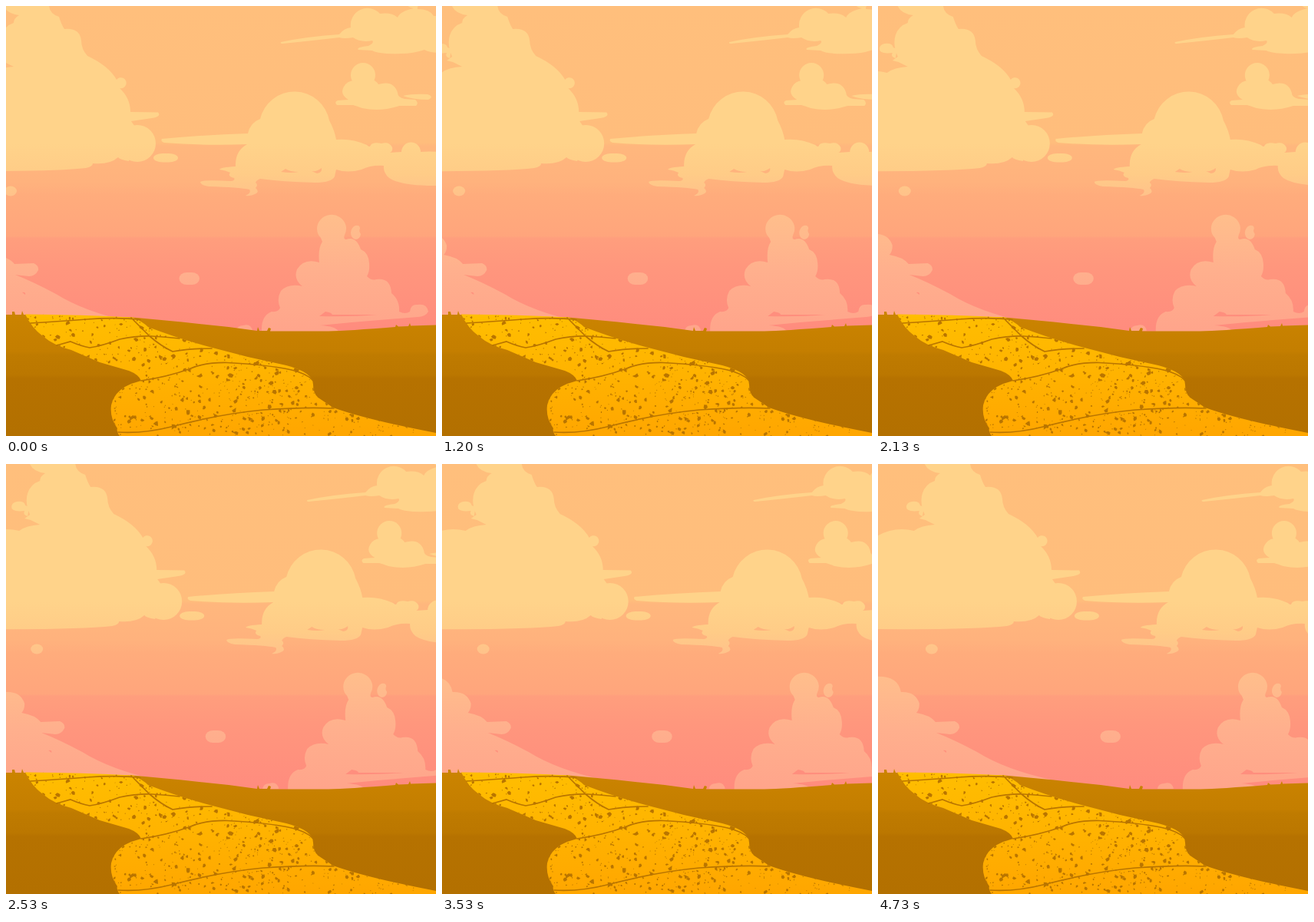
Write an HTML page that moves like this. It is 560 by 560 pixels and loops after 4800 ms.

```html
<!DOCTYPE html>
<html lang="en">
<head>
<meta charset="utf-8">
<title>Drifting clouds</title>
<style>
html, body { margin: 0; width: 100%; height: 100%; overflow: hidden; background: #ffbf7c; }
svg { display: block; width: 100%; height: 100%; }
</style>
</head>
<body>
<svg viewBox="0 0 560 560">
  <defs>
    <linearGradient id="sky" gradientUnits="userSpaceOnUse" x1="0" y1="0" x2="0" y2="560">
      <stop offset="0" stop-color="#ffbf7c"/>
      <stop offset=".318" stop-color="#ffbd7c"/>
      <stop offset=".325" stop-color="#ffb77d"/>
      <stop offset=".41" stop-color="#ffb27d"/>
      <stop offset=".44" stop-color="#ffac7c"/>
      <stop offset=".535" stop-color="#ffa57c"/>
      <stop offset=".54" stop-color="#ff9e7d"/>
      <stop offset=".61" stop-color="#ff967d"/>
      <stop offset=".68" stop-color="#ff917d"/>
      <stop offset=".75" stop-color="#ff8c7e"/>
    </linearGradient>
    <linearGradient id="cloud" gradientUnits="userSpaceOnUse" x1="0" y1="0" x2="0" y2="560">
      <stop offset=".32" stop-color="#ffd38a"/>
      <stop offset=".39" stop-color="#ffcc87"/>
      <stop offset=".44" stop-color="#ffc28a"/>
      <stop offset=".53" stop-color="#ffba8c"/>
      <stop offset=".62" stop-color="#ffaf8d"/>
      <stop offset=".75" stop-color="#ffa58b"/>
    </linearGradient>
    <linearGradient id="ground" gradientUnits="userSpaceOnUse" x1="0" y1="400" x2="0" y2="560">
      <stop offset="0" stop-color="#cb8400"/>
      <stop offset=".31" stop-color="#c47e00"/>
      <stop offset=".34" stop-color="#bf7b00"/>
      <stop offset=".5" stop-color="#bb7700"/>
      <stop offset=".53" stop-color="#b67200"/>
      <stop offset="1" stop-color="#b37000"/>
    </linearGradient>
    <linearGradient id="path" gradientUnits="userSpaceOnUse" x1="0" y1="400" x2="0" y2="560">
      <stop offset="0" stop-color="#ffbe00"/>
      <stop offset=".45" stop-color="#ffb400"/>
      <stop offset="1" stop-color="#ffa600"/>
    </linearGradient>
    <path id="road" d="M25 401.500Q100 402 165 405.500Q178 411 185 418Q224 433 265 444L315 457L365 468Q400 477 400 493Q400 506 408 511L426 523Q470 539 565 557V565H152Q143 555 145 550Q135 537 137 520Q141 501 163 492L176 488Q173 480 160 475L122 464L85 448Q62 442 48 430Q34 420 25 401.500Z"/>
    <clipPath id="roadClip"><use href="#road"/></clipPath>
  </defs>

  <rect width="560" height="560" fill="url(#sky)"/>

  <g id="clouds" fill="url(#cloud)">
    <!-- large left cloud -->
    <path d="M-70 97Q-45 80-17 87Q-8 80 10 79L-2 73L-10 71L-3 66Q-10 50-6 38Q-2 26 10 22Q10 16 17 12Q0 10-4-2H56Q56 10 69 14Q72 24 76 30Q96 28 98 45Q98 56 106 65Q134 78 144 96A7 7 0 1 1 148 107Q162 120 162 138L198 138.500Q203 144 190 146L163 150L170 160L160 202Q148 200 146 197Q135 207 113 205Q113 209 104 211Q60 216-70 215Z"/>
    <circle cx="171" cy="179" r="24"/>
    <path d="M-20 49Q-10 48-9 54L-4 56L-6 68Q-13 66-10 61Q-28 63-27 55Q-26 50-20 49Z"/>
    <ellipse cx="6" cy="241" rx="8" ry="6.500"/>
    <rect x="192" y="192" width="32" height="11.500" rx="12" ry="5.700"/>

    <!-- upper right clouds -->
    <path d="M358 47Q390 40 434 37Q440 29 449 28A22 22 0 0 1 487 10Q502 8 510 15Q513 7 531 3Q524 2 522-2H538Q535 2 536 4Q552 4 557 13H565V61Q552 61 545 57Q530 62 515 62Q485 63 477 58L459 57Q455 54 472 52Q480 48 477 45Q462 48 452 41Q440 43 434 41Q400 45 360 49Q357 49 358 47Z"/>
    <circle cx="465" cy="90" r="16"/>
    <path d="M452 97H480Q484 100 485 102Q505 96 510 113Q510 119 519 121L533 122Q538 126 534 130L512 130Q488 138 464 133Q456 130 452 129L431 129Q427 125 432 123L446 122Q434 115 440 105Q444 98 452 97Z"/>
    <path d="M517 117Q530 114 549 115Q558 118 550 122Q530 122 517 117Z"/>

    <!-- middle cloud -->
    <path d="M203 173Q255 168 315 166Q318 152 331 147A46 46 0 0 1 421 149Q428 162 430 174Q450 172 470 181Q474 185 475 181Q478 177 489 179Q499 176 503 184Q504 189 500 191L515 190A12.500 12.500 0 0 1 540 190Q550 189 565 190V234Q515 235 499 224Q491 217 492 208Q475 207 463 213Q445 218 430 213Q429 217 428 222Q424 230 402 230Q360 229 331 225Q326 227 325 230Q329 233 325 237Q330 241 326 244Q318 248 312 247Q320 243 317 239Q304 236 264 235Q253 233 253 229Q256 226 293 228Q299 227 297 224Q288 222 292 217Q286 214 278 213Q279 210 299 209Q298 189 314 180Q255 182 206 178Q201 176 203 173Z"/>
    <path fill="url(#sky)" d="M358 216L364 212Q370 216 381 216Q372 218 358 216ZM398 215Q405 216 411 211Q412 217 405 218Z"/>
    <rect x="225.500" y="347" width="26.500" height="16" rx="10" ry="8"/>

    <!-- low clouds -->
    <path d="M-70 277Q-38 274-34 297Q-15 296-10 312Q-10 320-14 324Q4 327 11 336L36 335Q43 338 42 344Q38 352 30 352L12 350Q35 359 65 375Q102 398 161 411V430H-70Z"/>
    <path fill="url(#sky)" d="M21 373Q26 372 25 376Z"/>
    <path d="M410 302A19 18 0 1 1 441 298Q439 304 443 304Q456 299 462 317Q472 321 473 335Q474 345 470 352Q476 358 482 356Q501 353 502 374Q513 383 512 398Q520 402 526 398Q527 388 536 389Q548 387 550 398Q546 405 536 405L450 412L409 416Q430 417 433 424H333Q332 403 346 398Q355 399 357 393Q352 382 358 371Q368 361 386 365Q374 356 379 343Q388 328 408 334Q406 316 412 307Z"/>
    <path fill="url(#sky)" d="M408 404L416 398Q424 399 425 402L483 402Q450 405 408 404Z"/>
    <path d="M455 286Q461 285 461 290Q459 293 462 297Q461 304 455 304Q449 302 449 295Q450 288 455 286ZM300 423Q301 416 309 416Q319 413 321 423Z"/>
  </g>

  <path fill="url(#ground)" d="M0 402L8 402V398L11 398L12 402L20 402L21 397L23 402L165 405.500L229 411.500L290 418L327 423L328 418L330 423L340 423L342 419L345 420L344 423.500L420 423.500Q445 423 507 418L508 415L511 417.500L524 417L526 413L527 416.500L560 415.500V560H0Z"/>
  <use href="#road" fill="url(#path)"/>
  <g clip-path="url(#roadClip)">
    <path id="specks" fill="#b97500"/>
  </g>
  <path fill="none" stroke="#b97500" stroke-width="1.700" stroke-linecap="round" d="M32 413Q65 411 105 408T175 408.500M66 442L84 437Q98 443 109 445Q124 443 148 434Q172 429 190 430T226 433M163 406Q173 416 187 430Q202 443 217 450Q240 446 268 446M176 488Q210 483 238 473Q258 464 288 464.500Q340 467 372 474Q392 479 399 487M146 555Q180 557 215 548Q280 531 335 526Q390 522 427 524"/>
</svg>
<script>
const LOOP = 4800, STEPS = 72, STEP_PX = 0.9;
const clouds = document.getElementById('clouds');

let seed = 7;
const random = () => (seed = seed * 16807 % 2147483647) / 2147483647;

function speck() {
  const x = 25 + random() * 535, y = 401 + random() * 159;
  const size = 0.6 + 2.5 * random() ** 3.5;
  const points = [];
  for (let i = 0; i < 6; i++) {
    const angle = i * Math.PI / 3, r = size * (0.5 + random());
    points.push((x + r * Math.cos(angle)).toFixed(1) + ' ' + (y + r * Math.sin(angle)).toFixed(1));
  }
  return 'M' + points.join('L') + 'Z';
}
document.getElementById('specks').setAttribute('d', Array.from({ length: 1400 }, speck).join(''));

function draw() {
  const time = performance.now() % LOOP;
  const step = Math.floor((time + 7) * STEPS / LOOP) % STEPS;
  clouds.setAttribute('transform', `translate(${step * STEP_PX} 0)`);
  requestAnimationFrame(draw);
}
draw();
</script>
</body>
</html>
```
